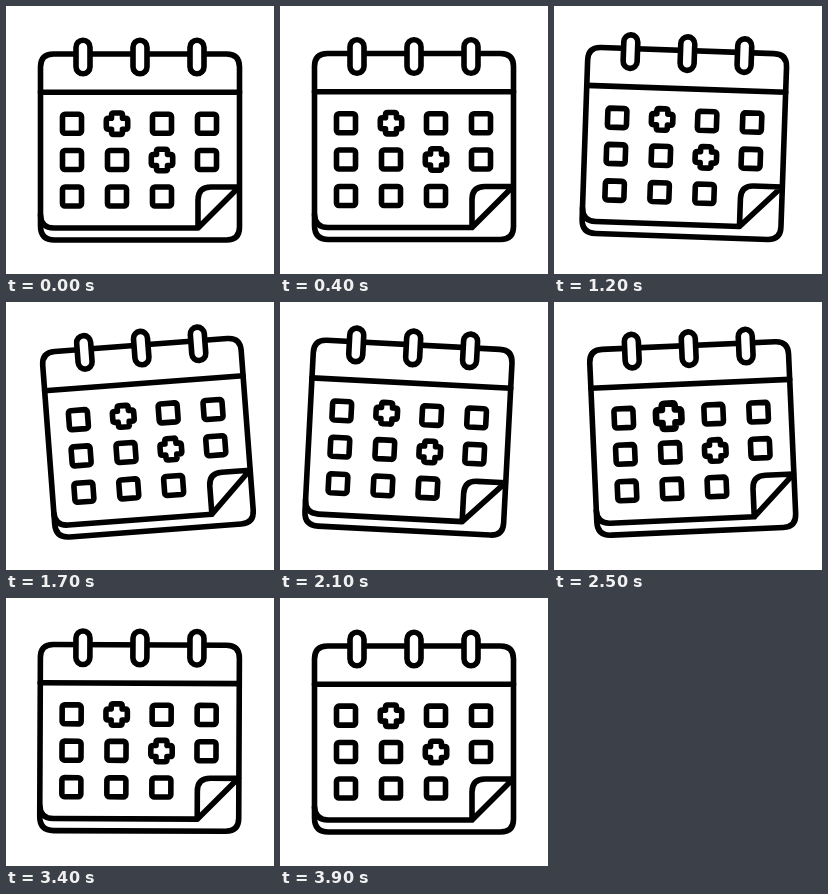
An HTML page for the animation above (4 s loop, 268 by 268 pixels).

```html
<!DOCTYPE html>
<html lang="en">
<head>
<meta charset="utf-8">
<title>Calendar</title>
<style>
  html, body { margin: 0; height: 100%; overflow: hidden; background: #fff; }
  svg { display: block; width: 100vw; height: 100vh; }
</style>
</head>
<body>
<svg viewBox="0 0 268 268">
  <defs>
    <rect id="day" x="-9.5" y="-9.5" width="19" height="19" rx="2.5"/>
    <path id="plus" d="M-5.500-8.500q0-2.200 2.200-2.200h6.600q2.200 0 2.200 2.200v3H8.500q2.200 0 2.200 2.200v6.600q0 2.200-2.200 2.200h-3v3q0 2.200-2.200 2.200h-6.600q-2.200 0-2.200-2.200v-3h-3q-2.200 0-2.200-2.200v-6.600q0-2.200 2.200-2.200h3z"/>
    <rect id="ring" x="-7" y="-16.700" width="14" height="33.500" rx="7"/>
  </defs>
  <g id="calendar" fill="none" stroke="#000" stroke-width="5.600" stroke-linecap="round" stroke-linejoin="round">
    <path d="M47.500 48H220.500Q233.500 48 233.500 61V221Q233.500 234 220.500 234H48.500Q34.500 234 34.500 220V61Q34.500 48 47.500 48z"/>
    <path d="M34.500 86.300H233.500M34.500 209Q35 222 48 222H192L233 181H205Q192 181 192 194V222"/>
    <g id="days"></g>
    <g fill="#fff">
      <use href="#ring" x="77" y="51"/>
      <use href="#ring" x="134" y="51"/>
      <use href="#ring" x="191" y="51"/>
    </g>
  </g>
</svg>
<script>
  const LOOP = 4000;
  // Turning points of the swing: time in ms, angle in degrees
  const SWING = [[0, 0], [720, 0], [900, -1.85], [1500, 5.8], [1740, -5],
                 [2000, 4], [2400, -2.75], [3120, 1.5], [3500, 0], [LOOP, 0]];
  const COLUMNS = [66, 111, 156, 201], ROWS = [117.7, 154, 190.5];
  const calendar = document.getElementById('calendar');
  const days = document.getElementById('days');
  const pluses = [];

  function addMark(shape, x, y) {
    const mark = document.createElementNS('http://www.w3.org/2000/svg', 'use');
    mark.setAttribute('href', '#' + shape);
    mark.setAttribute('transform', `translate(${x} ${y})`);
    days.append(mark);
    return mark;
  }

  ROWS.forEach((y, row) => COLUMNS.forEach((x, col) => {
    if (row === 2 && col === 3) return;
    const isPlus = row < 2 && col === row + 1;
    const mark = addMark(isPlus ? 'plus' : 'day', x, y);
    if (isPlus) pluses.push({ mark, x, y, peak: row ? 2900 : 2550 });
  }));

  const ease = p => (1 - Math.cos(Math.PI * p)) / 2;

  function angleAt(t) {
    const i = SWING.findIndex(([time]) => time > t);
    const [t0, a0] = SWING[i - 1], [t1, a1] = SWING[i];
    return a0 + (a1 - a0) * ease((t - t0) / (t1 - t0));
  }

  const pulse = (t, peak) => 1 + 0.2 * ease(Math.max(0, 1 - Math.abs(t - peak) / 250));

  function draw(now) {
    const t = now % LOOP;
    const lift = 5.2 * ease(2 * t / LOOP);
    calendar.setAttribute('transform', `translate(0 ${-lift}) rotate(${angleAt(t)} 134 35)`);
    for (const { mark, x, y, peak } of pluses) {
      mark.setAttribute('transform', `translate(${x} ${y}) scale(${pulse(t, peak)})`);
    }
  }

  const start = performance.now();
  function tick() {
    draw(performance.now() - start);
    requestAnimationFrame(tick);
  }
  tick();
</script>
</body>
</html>
```
